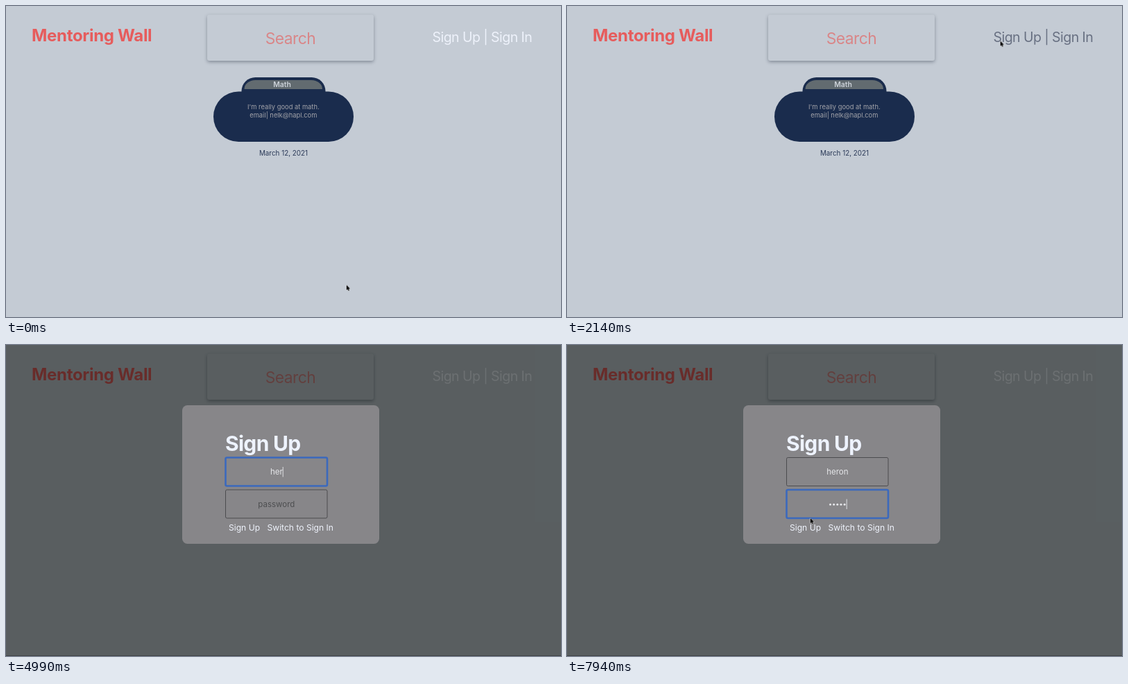
Animation, 800 px wide and 449 px high, one loop 7990 ms. Source, as an HTML page:

```html
<!DOCTYPE html>
<html lang="en">
<head>
<meta charset="utf-8">
<title>Mentoring Wall</title>
<style>
  html, body { margin: 0; width: 100%; height: 100%; overflow: hidden; background: #c4cbd4; }
  svg { display: block; width: 800px; height: 449px; font-family: Inter, "Open Sans", sans-serif; }
  text { white-space: pre; }
  .mid { text-anchor: middle; }

  .title { font-size: 24px; font-weight: 700; letter-spacing: -.3px; fill: #e65c5c; }
  .search { font-size: 22.8px; letter-spacing: -.5px; fill: #d98688; }
  .nav { font-size: 19.5px; letter-spacing: -.55px; }
  .box { fill: #c4cbd4; filter: drop-shadow(0 2px 2.5px rgba(20, 30, 45, .37)); }
  .subject { font-size: 10.4px; font-weight: 600; fill: #ccd2d9; }
  .note { font-size: 9.35px; fill: #a3a4aa; }
  .date { font-size: 9.9px; fill: #2b3a58; }
  .url { font-size: 6.9px; font-weight: 500; fill: #d4d5d7; }

  .heading { font-size: 30px; font-weight: 700; letter-spacing: -.7px; fill: #eef3fe; }
  .link { font-size: 12.1px; fill: #eef2fb; }
  .frame { fill: none; stroke: #4c4c4f; }
  .focus .frame { stroke: #3b69bd; stroke-width: 2.6px; }
  .hint, .value { font-size: 11.5px; }
  .hint { fill: #4d4e50; }
  .value { fill: #e6e7ea; }
  .caret { fill: #dedfe3; }

  /* One shared 7.99 s loop */
  .header, .card, .status, .modal, .nav, .cursor, .arrow, .beam {
    animation: 7.99s step-end infinite;
  }
  .header { animation-name: header; }
  .card { animation-name: card; }
  .status { animation-name: status; }
  .modal { animation-name: modal; }
  .nav { animation-name: nav; }
  .arrow { animation-name: arrow; }
  .beam { animation-name: beam; }
  .cursor { animation-name: move; animation-timing-function: ease-in-out; }

  @keyframes header {
    0%, 15.39% { visibility: visible; }
    12.27% { visibility: hidden; }
  }
  @keyframes card {
    0%, 16.65% { visibility: visible; }
    12.27% { visibility: hidden; }
  }
  @keyframes status {
    0%, 16.65% { visibility: hidden; }
    12.89% { visibility: visible; }
  }
  @keyframes modal {
    0% { visibility: hidden; }
    28.02% { visibility: visible; }
  }
  @keyframes nav {
    0%, 32.42% { fill: #eef2fb; }
    25.4% { fill: #687082; }
    28.02% { fill: #e0e5eb; }
  }
  @keyframes move {
    0%, .38% { transform: translate(490.8px, 402.8px); }
    5.38%, 18.52% { transform: translate(330.5px, 181.5px); }
    26.7%, 32.42% { transform: translate(624.6px, 50.5px); }
    41.8%, 91.86% { transform: translate(420.5px, 189px); }
    99.3%, 100% { transform: translate(350.8px, 250px); }
  }
  @keyframes arrow {
    0%, 98.4% { visibility: visible; }
    38.8% { visibility: hidden; }
  }
  @keyframes beam {
    0%, 53.69%, 98.4% { visibility: hidden; }
    38.8%, 91.86% { visibility: visible; }
  }
</style>
</head>
<body>
<svg viewBox="0 0 800 449">
  <rect width="800" height="449" fill="#c4cbd4"/>

  <g class="header">
    <text class="title" x="37" y="51">Mentoring Wall</text>
    <rect class="box" x="290" y="12.5" width="240" height="66.5" rx="3"/>
    <text class="search mid" x="410" y="55">Search</text>
    <text class="nav" x="614.5" y="51.5">Sign Up | Sign In</text>
  </g>

  <g class="card">
    <path d="M339.5 126V123a20 20 0 0 1 20-20h81a20 20 0 0 1 20 20v3z" fill="#1a2c4d"/>
    <path d="M343.5 120a16 13 0 0 1 16-13h80.5a16 13 0 0 1 16 13z" fill="#626b70"/>
    <rect x="299" y="123.5" width="202" height="72.5" rx="36.2" fill="#1a2c4d"/>
    <text class="subject mid" x="398" y="117.3">Math</text>
    <text class="note mid" x="399.8" y="149.3">I'm really good at math.</text>
    <text class="note mid" x="399.8" y="160.7">email| nelk@hapl.com</text>
    <text class="date mid" x="400" y="215.8">March 12, 2021</text>
  </g>

  <g class="status">
    <path d="M0 441.5h148a2 2 0 0 1 2 2V449H0z" fill="#2a2b2e"/>
    <text class="url" x="-1" y="450">tutoring-frontend-colinmarwood27.vercel.app</text>
  </g>

  <g class="modal">
    <rect width="800" height="449" fill="rgb(2 7 3 / .55)"/>
    <rect y="448" width="800" height="1" fill="#404446"/>
    <rect x="254" y="87" width="284" height="200" rx="7.5" fill="#878689"/>
    <text class="heading" x="316" y="152.5">Sign Up</text>
    <g id="user">
      <rect class="frame" x="316.5" y="162.5" width="146.5" height="41" rx="2"/>
      <text class="hint mid" x="389.8" y="187.2">username</text>
      <text class="value mid" x="389.8" y="187.2"></text>
      <rect class="caret" y="176" width="1" height="14.5"/>
    </g>
    <g id="pass">
      <rect class="frame" x="316.5" y="209" width="146.5" height="41" rx="2"/>
      <text class="hint mid" x="389.8" y="233.8">password</text>
      <g class="value"></g>
      <rect class="caret" y="222.5" width="1" height="14.5"/>
    </g>
    <text class="link" x="321" y="268">Sign Up</text>
    <text class="link" x="376.5" y="268">Switch to Sign In</text>
  </g>

  <g class="cursor">
    <path class="arrow" d="M0 0V7.6L1.7 6.1 2.8 8.6 4.1 8 3 5.6H5.4Z"
      fill="#000" stroke="#fff" stroke-width=".8" paint-order="stroke"/>
    <path class="beam" d="M-2.5-5.5Q0-5.5 0-4Q0-5.5 2.5-5.5M0-4V4M-2.5 5.5Q0 5.5 0 4Q0 5.5 2.5 5.5"
      fill="none" stroke="#1d1d1f"/>
  </g>
</svg>
<script>
  const LOOP = 7990, CENTER = 389.8, PITCH = 5.15, NAME = 'heron';
  const userKeys = [4490, 4740, 4990, 5140, 5340];
  const passKeys = [6090, 6340, 6590, 6690, 6840];

  function field(id) {
    const root = document.getElementById(id);
    const part = name => root.querySelector('.' + name);
    return { root, hint: part('hint'), value: part('value'), caret: part('caret') };
  }

  const user = field('user'), pass = field('pass');

  const dots = passKeys.map(() => {
    const dot = document.createElementNS('http://www.w3.org/2000/svg', 'circle');
    dot.setAttribute('cy', 230.3);
    dot.setAttribute('r', 1.5);
    return pass.value.appendChild(dot);
  });

  const typed = (keys, t) => keys.filter(k => k <= t).length;
  const show = (el, on) => { el.style.display = on ? '' : 'none'; };

  function update(f, focused, count, width, caretOn) {
    f.root.classList.toggle('focus', focused);
    show(f.hint, !count);
    show(f.caret, focused && caretOn);
    f.caret.setAttribute('x', CENTER + width / 2);
  }

  function render(t) {
    const letters = typed(userKeys, t), bullets = typed(passKeys, t);

    user.value.textContent = NAME.slice(0, letters);
    update(user, t >= 3390 && t < 5490, letters,
      letters ? user.value.getComputedTextLength() : 0, t < 4140 || t >= 4490);

    dots.forEach((dot, i) => {
      show(dot, i < bullets);
      dot.setAttribute('cx', CENTER + (i - (bullets - 1) / 2) * PITCH);
    });
    update(pass, t >= 5490, bullets, bullets * PITCH,
      t < 6090 || (t >= 6340 && t < 7190) || t >= 7690);
  }

  let start;
  function tick(now) {
    start ??= now;
    render((now - start) % LOOP);
    requestAnimationFrame(tick);
  }
  render(0);
  requestAnimationFrame(tick);
</script>
</body>
</html>
```
